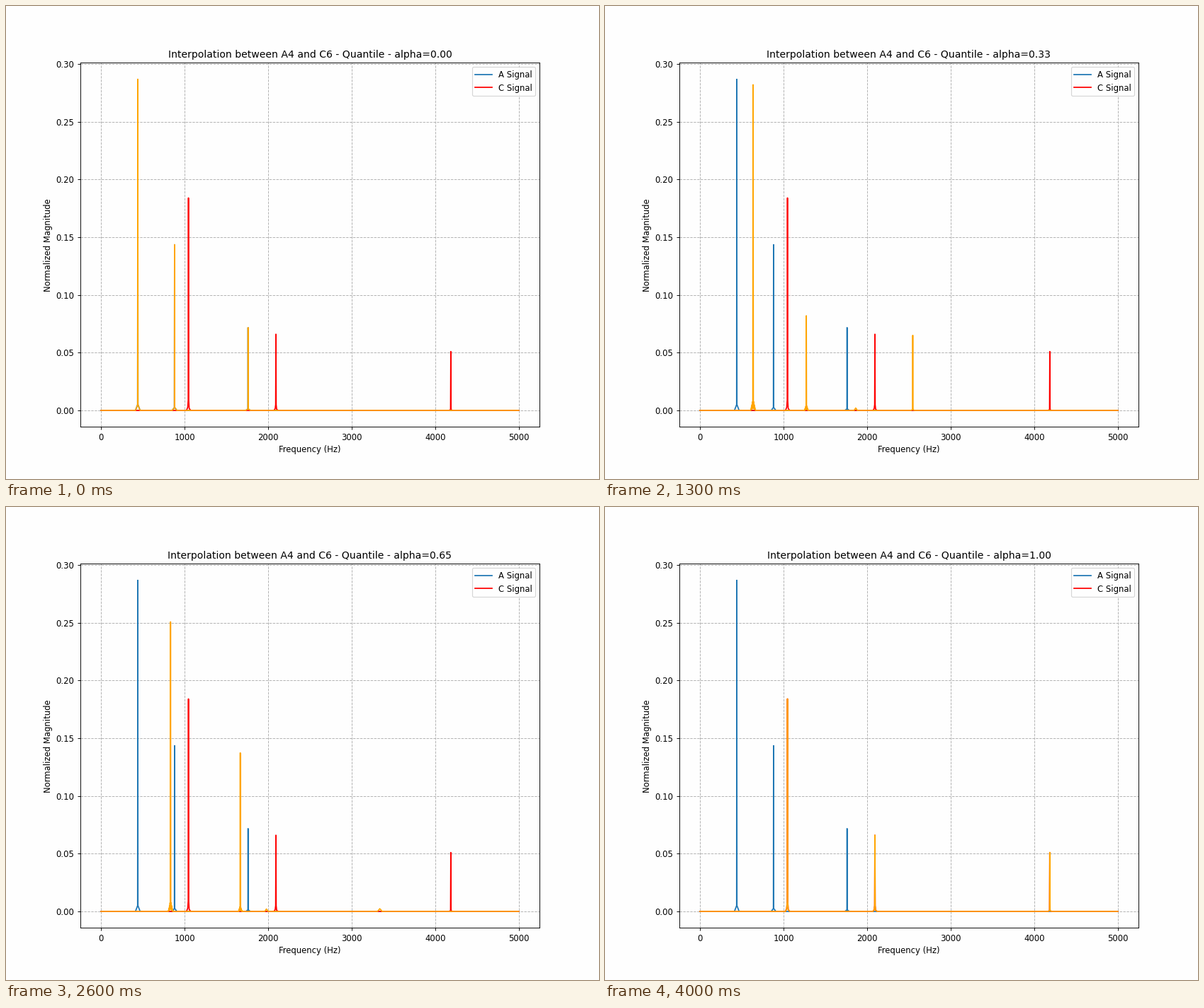
Recreate the animation shown at these times as a matplotlib script. Size 837 by 669 pixels, loop 4.1 s.

```python
import numpy as np
import matplotlib.pyplot as plt
from matplotlib.animation import FuncAnimation

W, H, DPI = 837, 669, 83.7
STEPS = 40
BACK = "#fefefe"

A_FREQ = np.array([440.0, 880.0, 1760.0])
C_FREQ = np.array([1046.5, 2093.0, 4186.0])
A_MAG = (0.2867, 0.1435, 0.0717)
C_MAG = (0.184, 0.066, 0.051)

# Heights of the three moving peaks at a few steps.
KEY_STEPS = (0, 8, 13, 22, 29, 34, 40)
KEY_MAGS = (
    (0.2867, 0.121, 0.282, 0.145, 0.330, 0.160, 0.184),
    (0.1435, 0.124, 0.082, 0.149, 0.1285, 0.164, 0.066),
    (0.0717, 0.0757, 0.065, 0.0025, 0.0022, 0.0027, 0.051),
)


def tent_peak(freq, mag, base, half=28):
    """Spike standing on a hollow tent."""
    return [(freq - half, 0), (freq - 2, base), (freq, mag),
            (freq + 2, base), (freq + half, 0)]


def foot_peak(freq, mag, base):
    """Spike with a tapering base and a low foot on the right."""
    return [(freq - 24, 0), (freq - 9, base * 0.3), (freq - 3, base),
            (freq, mag), (freq + 3, base), (freq + 9, base * 0.18),
            (freq + 28, 0)]


def cone_peak(freq, mag, base, half):
    """Spike on a cone filled by fast ripples."""
    offsets = np.linspace(-half, half, 21)
    env = base * (1 - np.abs(offsets) / half) ** 1.4
    ripple = np.where(np.arange(21) % 2, 0.25, 1.0)
    pts = list(zip(freq + offsets, env * ripple))
    pts[10] = (freq, max(mag, base))
    return pts


def bump(freq, mag, half):
    return [(freq - half, 0), (freq - half * 0.3, mag * 0.6), (freq, mag),
            (freq + half * 0.5, mag * 0.6), (freq + half, 0)]


def curve(*parts):
    pts = sorted((p for part in parts for p in part), key=lambda p: p[0])
    return np.array([(0, 0), *pts, (5000, 0)]).T


def a_curve():
    return curve(*(tent_peak(f, m, m * 0.0175)
                   for f, m in zip(A_FREQ, A_MAG)))


def c_curve():
    bases = (0.009, 0.005, 0.0012)
    return curve(*(foot_peak(f, m, b)
                   for f, m, b in zip(C_FREQ, C_MAG, bases)))


def mixed_curve(step):
    if step == 0:
        return a_curve()
    if step == STEPS:
        return c_curve()
    alpha = step / STEPS
    f1, f2, f3 = (1 - alpha) * A_FREQ + alpha * C_FREQ - 2
    m1, m2, m3 = (np.interp(step, KEY_STEPS, mags) for mags in KEY_MAGS)
    base = 0.008 + 0.0025 * np.sin(np.pi * alpha)
    half = 36 - 8 * alpha
    side = 1746 + 358 * alpha
    third = (foot_peak(f3, m3, 0.0014) if m3 > 0.004
             else bump(f3, m3, 28))
    return curve(cone_peak(f1, m1, base, half),
                 cone_peak(f2, m2, base * 0.5, half * 0.8),
                 bump(side, 0.0021, 20), third)


fig, ax = plt.subplots(figsize=((W + 0.01) / DPI, (H + 0.01) / DPI), dpi=DPI)
fig.set_facecolor(BACK)
ax.set_facecolor(BACK)
ax.plot(*a_curve(), color="#1f77b4", label="A Signal")
ax.plot(*c_curve(), color="red", label="C Signal")
line, = ax.plot([], [], color="orange")
ax.set_xlim(-250, 5250)
ax.set_ylim(-0.05 * A_MAG[0], 1.05 * A_MAG[0])
ax.set_xlabel("Frequency (Hz)")
ax.set_ylabel("Normalized Magnitude")
ax.grid(True, linestyle="--")
ax.legend(loc="upper right", facecolor=BACK)
title = ax.set_title("")


def draw(step):
    line.set_data(*mixed_curve(step))
    title.set_text("Interpolation between A4 and C6 - Quantile"
                   f" - alpha={step / STEPS:.2f}")
    return line, title


anim = FuncAnimation(fig, draw, frames=STEPS + 1, interval=100,
                     repeat=True, repeat_delay=0, blit=False)
plt.show()
```
